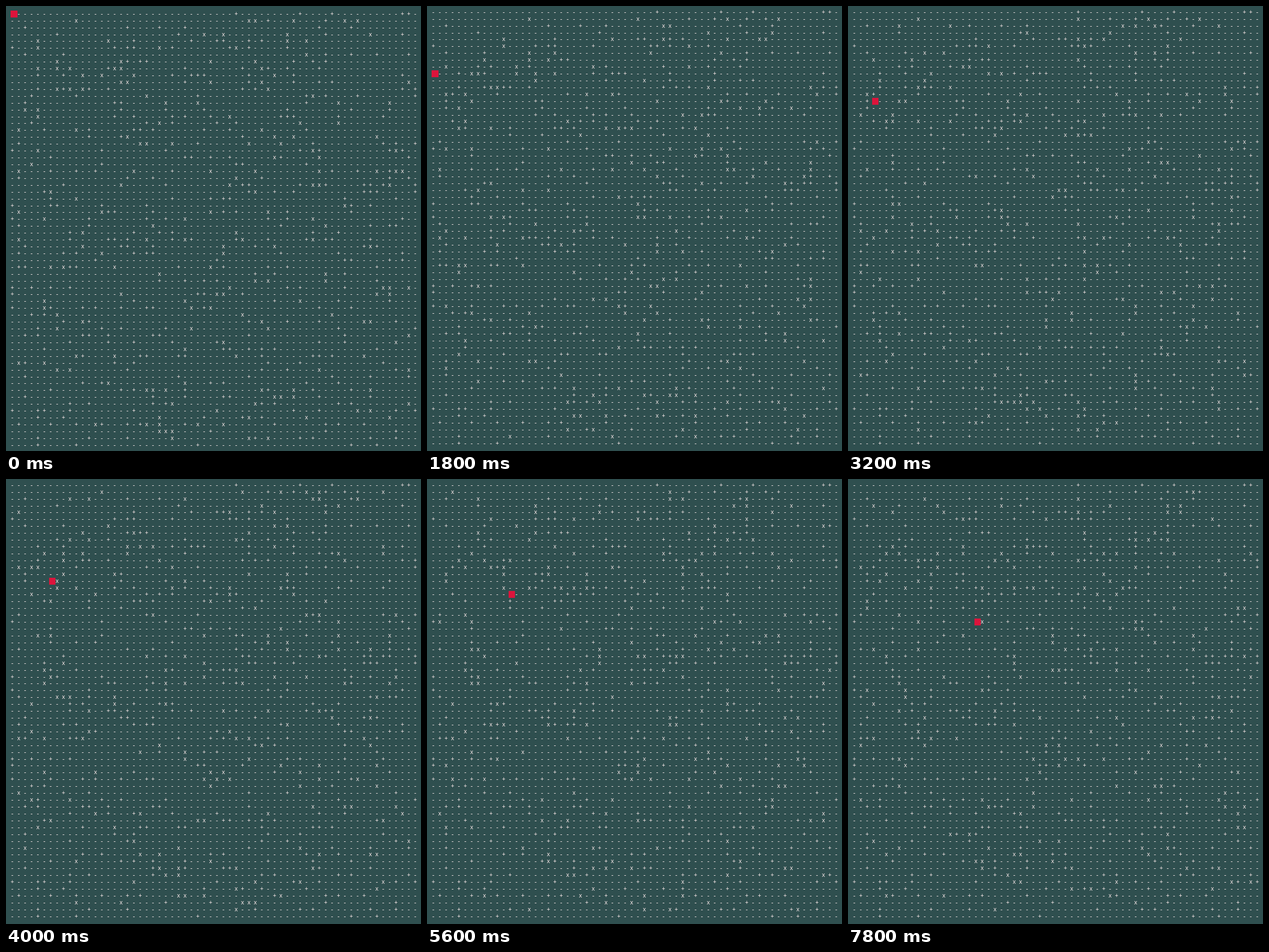
An HTML page with a canvas that plays this animation: 722x775 px, repeating every 8000 ms.

```html
<!DOCTYPE html>
<html lang="en">
<head>
<meta charset="utf-8">
<title>Dungeon walk</title>
<style>
  html, body { margin: 0; width: 100%; height: 100%; overflow: hidden; background: #2f4f4f; }
  canvas { display: block; }
</style>
</head>
<body>
<canvas id="stage" width="722" height="775"></canvas>
<script>
const SIZE = 64, STEP_MS = 200, STEPS = 40, WALKERS = 200;
const LEFT = 11, TOP = 10.75, COL = 11.127, ROW = 11.92;
const PATH = 'DDDDDDDDD' + 'DRDRDRD' + 'RRRDRRRD' + 'RRRDRRRRD' + 'RDRDRD';
const ctx = document.getElementById('stage').getContext('2d');

let seed = 20;
function random() {
  seed = (seed + 0x6D2B79F5) | 0;
  let t = Math.imul(seed ^ (seed >>> 15), 1 | seed);
  t = (t + Math.imul(t ^ (t >>> 7), 61 | t)) ^ t;
  return ((t ^ (t >>> 14)) >>> 0) / 4294967296;
}
const randomInt = (low, high) => low + Math.floor(random() * (high - low + 1));
const inside = n => Math.min(SIZE - 2, Math.max(1, n));
const cell = (col, row) => row * SIZE + col;

const ground = Array.from({ length: SIZE * SIZE }, () => random() < 0.1 ? '+' : '-');

// Every walker takes one random step per tick and stays off the border.
let walkers = Array.from({ length: WALKERS }, () => [randomInt(1, SIZE - 2), randomInt(1, SIZE - 2)]);
const occupied = [];
for (let step = 0; step < STEPS; step++) {
  occupied.push(new Set(walkers.map(([col, row]) => cell(col, row))));
  walkers = walkers.map(([col, row]) => [inside(col + randomInt(-1, 1)), inside(row + randomInt(-1, 1))]);
}

function playerAt(step) {
  const moves = [...PATH.slice(0, step)];
  const col = moves.filter(move => move === 'R').length;
  return [col, step - col];
}

function drawPlayer(col, row, top) {
  const x = LEFT - 2.8 + col * COL;
  const left = Math.round(x), right = Math.round(x + 11.4);
  ctx.fillStyle = '#dc143c';
  ctx.fillRect(left, Math.round(top + row * ROW) - 6, right - left, 12);
}

function draw(step) {
  const [playerCol, playerRow] = playerAt(step);
  // The tall player block pushes the whole map down while it is on the first line.
  const top = TOP + (playerRow === 0 ? 3 : 0);

  ctx.fillStyle = '#2f4f4f';
  ctx.fillRect(0, 0, 722, 775);
  ctx.fillStyle = '#ffeeee';
  ctx.font = '10px "Liberation Mono", monospace';
  ctx.textAlign = 'center';
  for (let row = 0; row < SIZE; row++) {
    const baseline = Math.round(top + row * ROW) + 3;
    for (let col = 0; col < SIZE; col++) {
      const index = cell(col, row);
      if (index === cell(playerCol, playerRow)) continue;
      const glyph = occupied[step].has(index) ? 'x' : ground[index];
      ctx.fillText(glyph, LEFT + col * COL, baseline);
    }
  }
  drawPlayer(playerCol, playerRow, top);
}

let shown = -1;
function tick() {
  const step = Math.floor(performance.now() / STEP_MS) % STEPS;
  if (step !== shown) draw(shown = step);
  requestAnimationFrame(tick);
}
tick();
</script>
</body>
</html>
```
